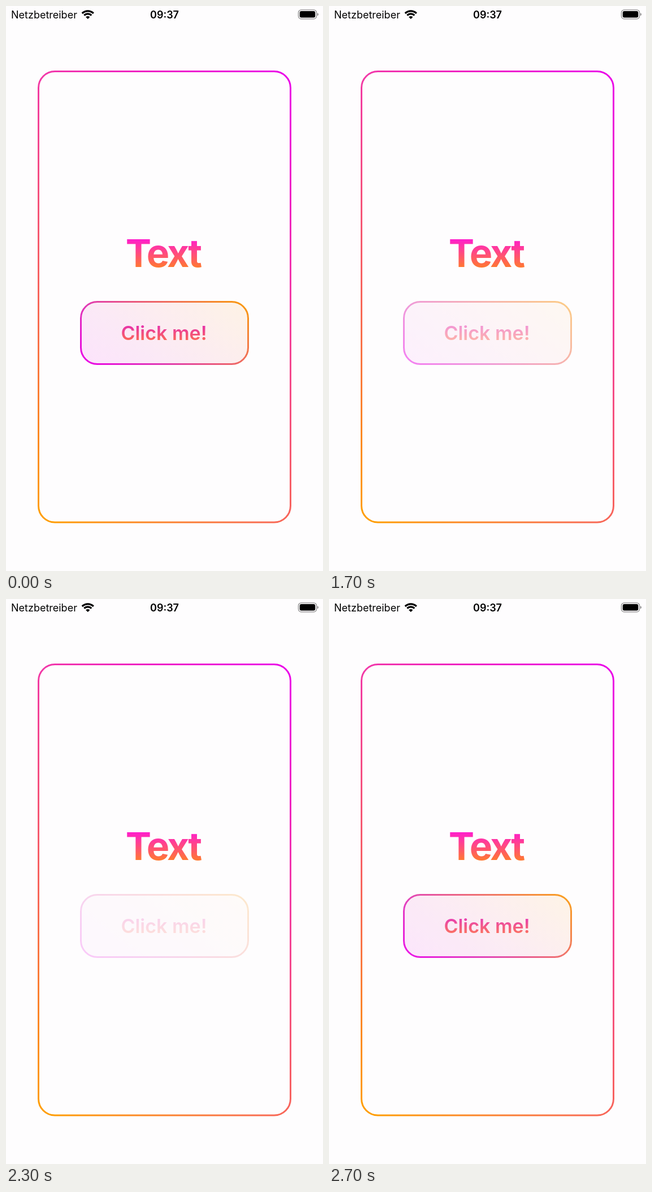
Animation of 561 by 998 pixels, one loop 2.8 s. Source, as an HTML page:

```html
<!DOCTYPE html>
<html lang="de">
<head>
<meta charset="utf-8">
<title>Gradient button</title>
<style>
  html, body { margin: 0; width: 100%; height: 100%; overflow: hidden; background: #fefdfe; }
  svg { display: block; width: 561px; height: 998px; }
  text { font-family: Inter, sans-serif; font-optical-sizing: none; }
  .status { font-size: 18px; }
  .middle { text-anchor: middle; }
  .title { font-size: 68px; font-weight: 700; letter-spacing: -3px; }
  .label { font-size: 34px; font-weight: 600; }
  .outline { fill: none; stroke-width: 3; }
</style>
</head>
<body>
<svg viewBox="0 0 561 998">
  <defs>
    <linearGradient id="cardLine" gradientUnits="userSpaceOnUse" x1="505" y1="114" x2="-86" y2="787">
      <stop stop-color="#ea00ea"/><stop offset=".33" stop-color="#f238a8"/>
      <stop offset=".67" stop-color="#f8665a"/><stop offset="1" stop-color="#ffa000"/>
    </linearGradient>
    <linearGradient id="buttonLine" gradientUnits="userSpaceOnUse" x1="131" y1="634" x2="296" y2="418.5">
      <stop stop-color="#ea00ea"/><stop offset=".33" stop-color="#e038b4"/>
      <stop offset=".67" stop-color="#f06c5c"/><stop offset="1" stop-color="#fa9d08"/>
    </linearGradient>
    <linearGradient id="titleFill" gradientUnits="userSpaceOnUse" x1="0" y1="396" x2="0" y2="477">
      <stop stop-color="#ff00ff"/><stop offset="1" stop-color="#ff9500"/>
    </linearGradient>
    <linearGradient id="labelFill" gradientUnits="userSpaceOnUse" x1="0" y1="556" x2="0" y2="595">
      <stop stop-color="#e020c8"/><stop offset="1" stop-color="#ff7048"/>
    </linearGradient>
  </defs>

  <text class="status" x="9" y="21.5">Netzbetreiber</text>
  <g fill="none" stroke="#000" stroke-width="3.2">
    <path d="M134.8 13A14.2 14.2 0 0 1 154.8 13"/>
    <path d="M138.4 16.6A9 9 0 0 1 151.2 16.6"/>
    <path d="M144.8 23L141.2 19.4A5.1 5.1 0 0 1 148.4 19.4Z" fill="#000" stroke="none"/>
  </g>
  <text class="status middle" x="280.5" y="21.5" font-weight="600">09:37</text>
  <rect x="517.4" y="6.8" width="32.2" height="16" rx="5" fill="none" stroke="#8d8c8d" stroke-width="1.3"/>
  <rect x="519.7" y="9.1" width="27.6" height="11.4" rx="3"/>
  <path d="M551 12.2Q553 13 553 14.8T551 17.4Z" fill="#8d8c8d"/>

  <rect class="outline" x="57.5" y="115.5" width="446" height="796.5" rx="29" stroke="url(#cardLine)"/>
  <text class="title middle" x="278" y="461" fill="url(#titleFill)">Text</text>

  <g id="button">
    <rect x="132.5" y="522.5" width="296" height="110" rx="29" fill="url(#buttonLine)" fill-opacity=".1"/>
    <rect class="outline" x="132.5" y="522.5" width="296" height="110" rx="29" stroke="url(#buttonLine)"/>
    <text class="label middle" x="279.5" y="589.5" fill="url(#labelFill)">Click me!</text>
  </g>
</svg>
<script>
  const duration = 2800;
  // [time in ms, button opacity]; each value holds until the next
  const steps = [
    [0, 1],
    [1500, .2], [1700, .5], [1800, .85], [1900, 1],
    [2300, .2], [2600, .6], [2700, .93], [duration, 1]
  ];
  document.getElementById('button').animate(
    steps.map(([time, opacity]) => ({ offset: time / duration, opacity, easing: 'steps(1, end)' })),
    { duration, iterations: Infinity }
  );
</script>
</body>
</html>
```
